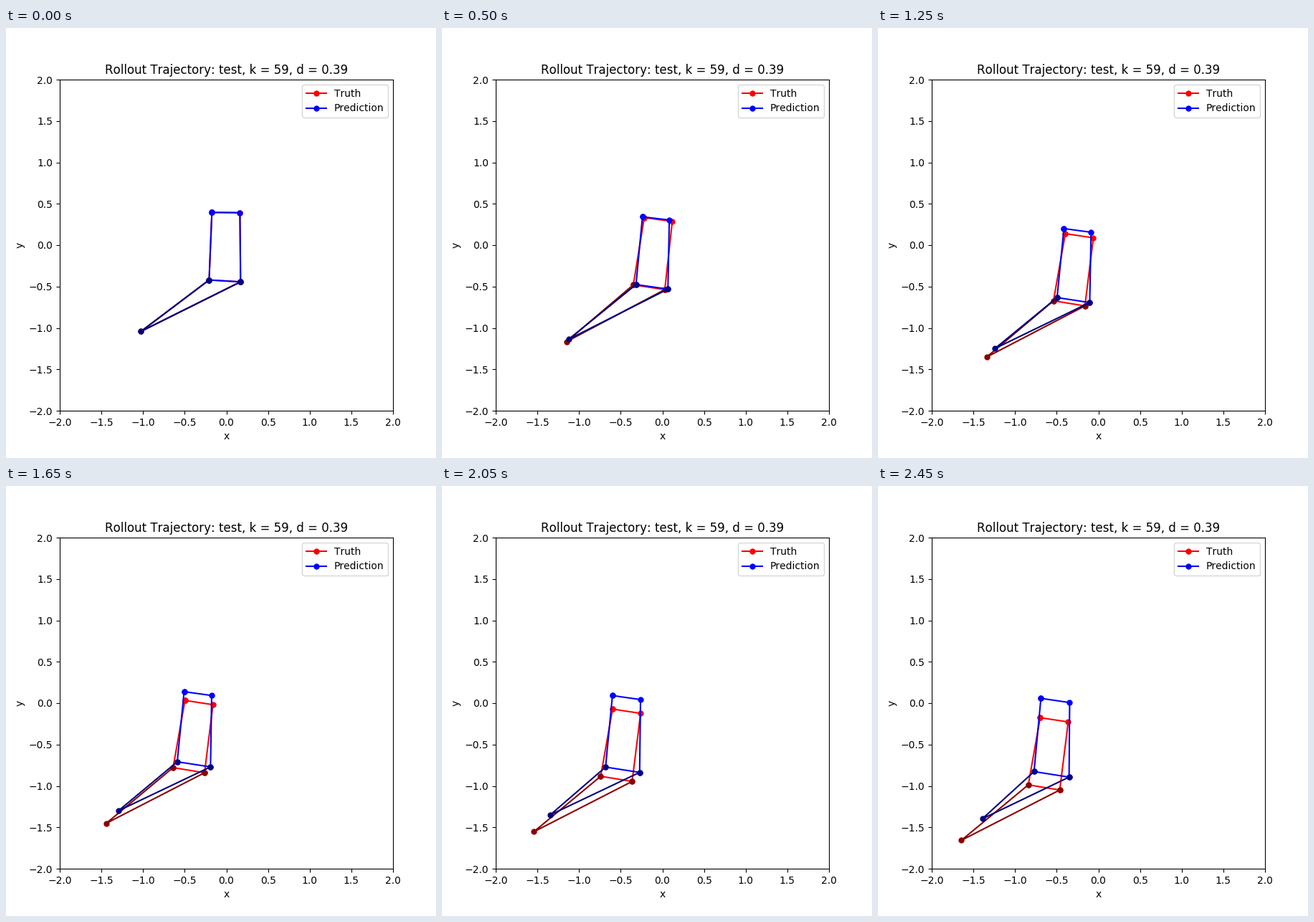
These frames come from a looping animation (600 px wide and 600 px high, 2500 ms). A matplotlib script:

```python
import numpy as np
import matplotlib.pyplot as plt
from matplotlib.animation import FuncAnimation

FRAMES, INTERVAL = 50, 50
LAST = FRAMES - 1

plt.rcParams["text.kerning_factor"] = 6
plt.rcParams["lines.markersize"] = 5

# Nodes: top left, top right, bottom right, bottom left, tip (stage pixels)
START = np.array([(287.3, 257.3), (326.4, 257.7), (327.3, 354.2),
                  (283.4, 351.6), (188.4, 423.3)])
BOX = [0, 1, 2, 3, 0]
ARM = [3, 4, 2]

# The true body drifts steadily after a short twist and a brief sway.
DRIFT = np.array([-1.463, 1.49])
TWIST = np.array([(10.7, -7), (10.7, -1.5), (-2, -3), (-2, -7.6), (-0.3, -2)])
SWAY = np.array([(0, -1.5)] * 4 + [(0, 1.5)])

# The prediction twists a little differently, then its error grows.
KICK = np.array([(-3, 0), (-5, -1), (4.5, 0), (4, 0.5), (0, 0)])
ERROR = np.array([(4, -27), (7, -26), (8.5, -18), (4, -19), (29.2, -30)])
GROWTH = np.array([[2], [2], [2], [2], [1.35]])


def settle(t):
    return 1 - np.exp(-t / 4.5)


def pulse(t, peak=13):
    x = t / peak
    return (x * np.exp(1 - x)) ** 3


def truth(t):
    return START + DRIFT * t + TWIST * settle(t) + SWAY * pulse(t)


def prediction(t):
    return truth(t) + KICK * settle(t) + ERROR * (t / LAST) ** GROWTH


def to_data(p):
    """Convert stage pixels to axis coordinates."""
    return (p - (307.5, 303)) / (116.25, -115.5)


fig, ax = plt.subplots(figsize=(6, 6), dpi=100)
ax.set(xlim=(-2, 2), ylim=(-2, 2), xlabel="x", ylabel="y",
       title="Rollout Trajectory: test, k = 59, d = 0.39")

bodies = []
for label, path, bright, dark in [("Truth", truth, "red", "darkred"),
                                  ("Prediction", prediction, "blue", "navy")]:
    box, = ax.plot([], [], "o-", color=bright, label=label)
    arm, = ax.plot([], [], "o-", color=dark)
    bodies.append((path, box, arm))
ax.legend(loc="upper right")


def update(frame):
    artists = []
    for path, box, arm in bodies:
        nodes = to_data(path(frame))
        box.set_data(*nodes[BOX].T)
        arm.set_data(*nodes[ARM].T)
        artists += [box, arm]
    return artists


anim = FuncAnimation(fig, update, frames=FRAMES, interval=INTERVAL,
                     repeat=True, repeat_delay=0)
plt.show()
```
